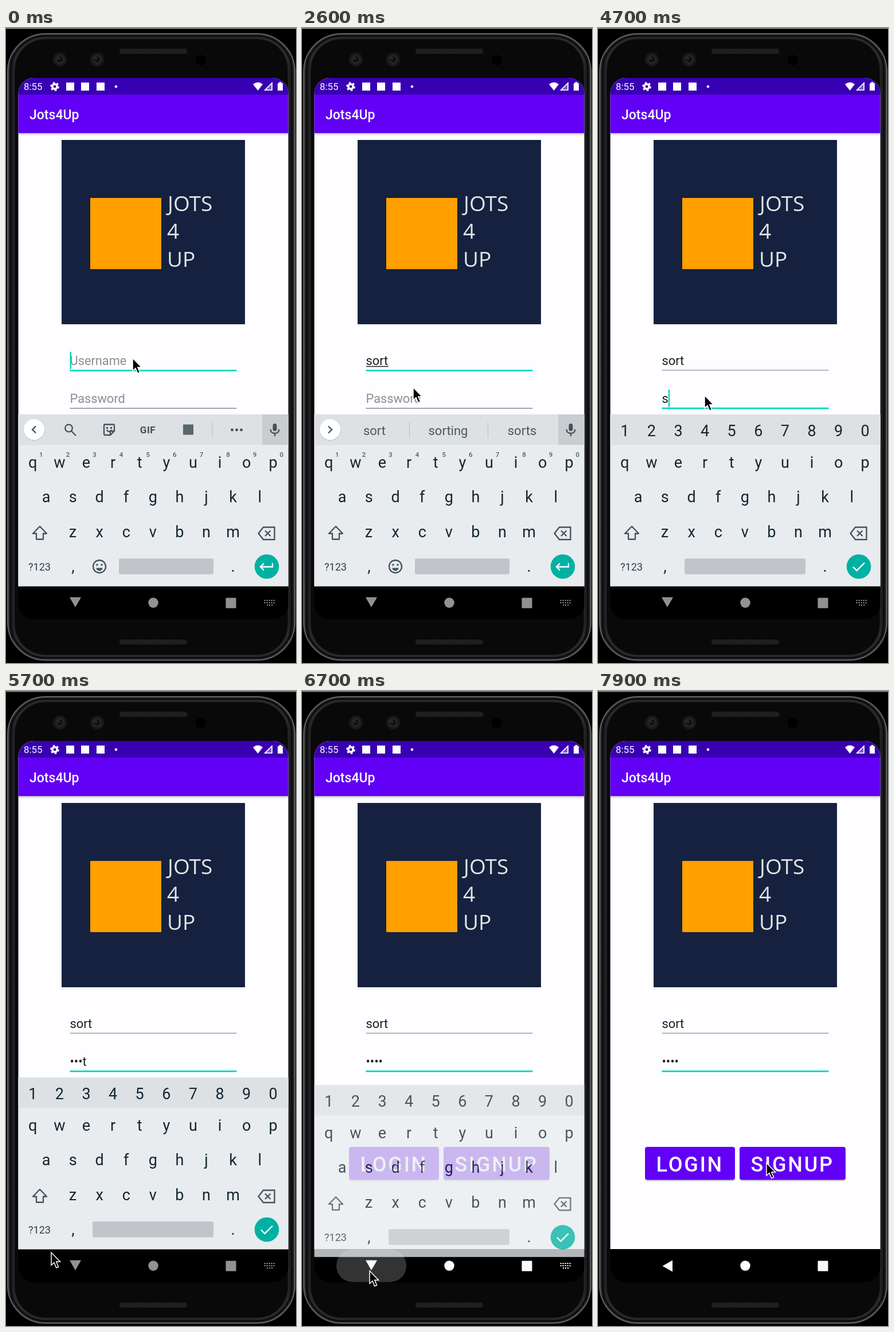
An HTML page that plays this animation: 506 px wide and 1106 px high, repeating every 8000 ms.

```html
<!DOCTYPE html>
<html lang="en">
<head>
<meta charset="utf-8">
<title>Login on a phone</title>
<style>
  html, body { margin: 0; width: 100%; height: 100%; overflow: hidden; background: #000; }
  svg { display: block; width: 506px; height: 1106px; font-family: Roboto, sans-serif; }
  .line { fill: none; stroke: #43525a; stroke-width: 2.3; }
  .key { font-size: 27px; fill: #14262f; text-anchor: middle; }
  .hint { font-size: 11.5px; font-weight: 500; fill: #4d5b62; text-anchor: middle; }
  .word { font-size: 22px; fill: #4a585f; text-anchor: middle; }
  .field { font-size: 21.8px; white-space: pre; }
  .btn { font-size: 36px; font-weight: 500; letter-spacing: 2.8px; fill: #fff; }
  .art { font-family: "Open Sans", sans-serif; font-size: 37px; fill: #e4e6e4; }
</style>
</head>
<body>
<svg viewBox="0 0 506 1106">
  <defs>
    <clipPath id="screen"><rect x="21.5" y="87" width="471" height="943" rx="27"/></clipPath>
    <linearGradient id="rim">
      <stop offset="0" stop-color="#3b3b3d"/><stop offset=".012" stop-color="#151516"/>
      <stop offset=".024" stop-color="#2a2a2c"/><stop offset=".976" stop-color="#2a2a2c"/>
      <stop offset=".988" stop-color="#151516"/><stop offset="1" stop-color="#3b3b3d"/>
    </linearGradient>
    <linearGradient id="shade" x2="0" y2="1">
      <stop offset="0" stop-color="#000" stop-opacity=".22"/><stop offset="1" stop-color="#000" stop-opacity="0"/>
    </linearGradient>
    <pattern id="mesh" width="4" height="4" patternUnits="userSpaceOnUse">
      <rect width="4" height="4" fill="#29292b"/><path d="M0 0L4 4M4 0L0 4" stroke="#141415"/>
    </pattern>
    <g id="lens">
      <circle r="12" fill="#19191b"/><circle r="8" fill="#252528"/><circle r="5" fill="#111114"/>
      <circle cx="-2" cy="-2" r="1.6" fill="#414148"/>
    </g>
  </defs>

  <!-- phone body -->
  <rect width="506" height="1106"/>
  <rect width="506" height="1.5" fill="#8b8b8b"/>
  <rect x="3" y="10" width="501" height="1091" rx="66" fill="url(#rim)" stroke="#626264" stroke-width="2"/>
  <rect x="8" y="14" width="491" height="1083" rx="61" fill="none" stroke="#0d0d0e" stroke-width="3"/>
  <rect x="15" y="19" width="477" height="1073" rx="54" fill="#09090a" stroke="#1f1f21"/>
  <use href="#lens" x="94" y="55"/><use href="#lens" x="159" y="55"/>
  <circle cx="340" cy="56" r="9"/>
  <rect x="198" y="36" width="118" height="9" rx="4" fill="url(#mesh)"/>
  <rect x="198" y="1065" width="118" height="9" rx="4" fill="url(#mesh)"/>

  <g clip-path="url(#screen)">
    <rect x="21" y="87" width="472" height="886" fill="#fefdff"/>
    <rect x="21" y="183" width="472" height="5" fill="url(#shade)"/>
    <rect x="21" y="115" width="472" height="68" fill="#6200f5"/>
    <rect x="21" y="87" width="472" height="29" fill="#3900b3"/>
    <g fill="#fff">
      <text x="31" y="108" font-size="16.8">8:55</text>
      <circle cx="85" cy="102" r="4.2" fill="none" stroke="#fff" stroke-width="3.6"/>
      <circle cx="85" cy="102" r="6.7" fill="none" stroke="#fff" stroke-width="2.4" stroke-dasharray="3.5 3.516"/>
      <rect x="105" y="95" width="14" height="14"/>
      <rect x="131" y="95" width="14" height="14"/>
      <rect x="158" y="95" width="14" height="14"/>
      <circle cx="192" cy="102" r="2.3"/>
      <path d="M431 98Q439.500 91 448 98L439.500 109Z"/>
      <path d="M465 94V109H450Z" opacity=".35"/>
      <path d="M464 96V108H452Z" fill="none" stroke="#fff" stroke-width="1.7"/>
      <path d="M474 96h2.500v-2h4v2h2.500v13h-9z"/>
      <text x="41" y="159" font-size="23" font-weight="500">Jots4Up</text>
    </g>

    <rect x="97" y="195" width="320" height="321" fill="#15213f"/>
    <rect x="147" y="296" width="124" height="124" fill="#ff9f00"/>
    <text class="art" x="282" y="319">JOTS</text>
    <text class="art" x="281" y="367">4</text>
    <text class="art" x="281" y="416">UP</text>

    <text class="field" id="user" x="111.500" y="587"></text>
    <path id="compose" d="M112 589.500H148" stroke="#222" stroke-width="1.3"/>
    <path id="userLine"/>
    <text class="field" id="pass" x="111.500" y="653"></text>
    <path id="passLine"/>
    <rect id="caret" width="2.400" height="30" fill="#08d3bd"/>

    <g id="buttons">
      <rect x="82" y="796" width="157" height="58" rx="5" fill="#000" opacity=".16"/>
      <rect x="247" y="796" width="185" height="58" rx="5" fill="#000" opacity=".16"/>
      <rect x="82" y="794" width="157" height="57.500" rx="4" fill="#6200f5"/>
      <rect x="247" y="794" width="185" height="57.500" rx="4" fill="#6200f5"/>
      <text class="btn" x="101.500" y="837">LOGIN</text>
      <text class="btn" x="266.500" y="837">SIGNUP</text>
    </g>

    <rect x="21" y="972" width="472" height="58"/>
    <rect id="ripple" x="60" y="972.500" width="122" height="57" rx="28" fill="#333334"/>
    <g id="nav">
      <path id="back" d="M111 991.500H131L121 1009Z"/>
      <circle cx="257" cy="1001" r="8.700"/>
      <rect x="383.500" y="992.500" width="18" height="18" rx="1"/>
      <path id="kbIcon" fill="none" stroke-width="2.200" stroke-dasharray="2.200 1.800"
        d="M450.500 997H470M450.500 1001H470M455 1005H466"/>
    </g>

    <g id="kb">
      <rect x="21" y="673" width="472" height="299.500" fill="#e8ecef"/>
      <rect x="21" y="673" width="472" height="53" fill="#dde1e4"/>
      <g id="keys"></g>
      <path class="line" d="M59 868L71 880.500H65V890.500H53V880.500H47Z" stroke-linejoin="round"/>
      <path class="line" d="M449 869.500H468.500V891H449L440.500 880.200ZM452 875.500L461.500 885M461.500 875.500L452 885"/>
      <text x="58.500" y="944.500" font-size="18" fill="#2f3f47" text-anchor="middle">?123</text>
      <text class="key" x="117" y="947">,</text>
      <text class="key" x="396" y="947">.</text>
      <rect id="space" y="924" height="27.500" rx="3" fill="#c1c5c9"/>
      <circle cx="455" cy="938" r="21.300" fill="#00b1a3"/>
      <path id="enter" fill="none" stroke="#fff" stroke-width="2.300"/>

      <g id="textOnly">
        <g id="hints"></g>
        <circle class="line" cx="163" cy="938" r="11"/>
        <g fill="#43525a"><circle cx="159" cy="935" r="1.800"/><circle cx="167" cy="935" r="1.800"/></g>
        <path d="M157 940.500H169Q167 945.500 163 945.500T157 940.500Z" fill="#43525a"/>
        <rect x="447" y="673" width="46" height="53" fill="#cacdd0"/>
        <rect x="465.500" y="689" width="7" height="13" rx="3.500" fill="#43525a"/>
        <path class="line" d="M461.500 699Q462 706 469 706T476.500 699M469 706V711"/>
        <circle cx="49" cy="700.500" r="18.500" fill="#000" opacity=".14"/>
        <circle cx="49" cy="699.500" r="18" fill="#fff"/>
        <path class="line" id="chevron"/>
        <g id="tools">
          <circle class="line" cx="109.500" cy="697" r="6.300"/>
          <path class="line" d="M114 702L122 710" stroke-width="3"/>
          <path class="line" d="M173 690.500H187Q189 690.500 189 692.500V702L182 709H173Q171 709 171 707V692.500Q171 690.500 173 690.500ZM189 702H182V709M175.500 700Q180 706 184.500 700" stroke-width="2"/>
          <path d="M175 695h3v3h-3zM182 695h3v3h-3z" fill="#43525a"/>
          <text x="247.500" y="705.500" font-size="17" font-weight="700" fill="#43525a" text-anchor="middle" letter-spacing=".5">GIF</text>
          <rect x="309" y="690.500" width="18" height="18" fill="#59666d"/>
          <path d="M360 686V713" stroke="#b9bec2"/>
          <g fill="#43525a"><circle cx="394.500" cy="700" r="2.400"/><circle cx="402.500" cy="700" r="2.400"/><circle cx="410.500" cy="700" r="2.400"/></g>
        </g>
        <g id="words">
          <path d="M187.500 686V713M324.500 686V713" stroke="#b9bec2"/>
          <text class="word" x="126.500" y="708.500">sort</text>
          <text class="word" x="255" y="708.500">sorting</text>
          <text class="word" x="384" y="708.500">sorts</text>
        </g>
      </g>
      <g id="digits"></g>
    </g>
  </g>

  <path id="mouse" d="M0 0V22L5 17.500L8.700 26.500L12.500 25L8.800 16H15.500Z" stroke="#fff" stroke-width="1.500"/>
</svg>
<script>
const $ = id => document.getElementById(id);
const LOOP = 8000, STEP = 100, PITCH = 46.6;
const WORD = "sort";
const userTimes = [1600, 1750, 1900, 2050];
const passTimes = [4550, 4750, 4950, 5150];
const SWITCH = 3600, MASK = 1500, HIDE = 6600, HIDDEN = 6860;
// time, x, y
const moves = [[0, 221, 575], [2300, 221, 575], [2600, 194, 626], [2900, 186, 640], [5200, 186, 640],
  [5700, 79, 978], [6300, 118, 1010], [7000, 118, 1010], [7900, 294, 822]];

const row = (chars, x, y, cls) => [...chars].map((c, i) =>
  `<text class="${cls}" x="${x + i * PITCH}" y="${y}">${c}</text>`).join("");
$("keys").innerHTML = row("qwertyuiop", 46.8, 766, "key") + row("asdfghjkl", 70, 826, "key") +
  row("zxcvbnm", 116.5, 887, "key");
$("hints").innerHTML = row("1234567890", 61.3, 747, "hint");
$("digits").innerHTML = row("1234567890", 46.8, 710.5, "key");

const set = (id, attrs) => { for (const k in attrs) $(id).setAttribute(k, attrs[k]); };
const show = (id, on) => set(id, { visibility: on ? "visible" : "hidden" });
const clamp = v => Math.max(0, Math.min(1, v));

function mouseAt(t) {
  let i = 0;
  while (i < moves.length - 2 && t > moves[i + 1][0]) i++;
  const [a, b] = [moves[i], moves[i + 1]];
  const p = clamp((t - a[0]) / (b[0] - a[0]));
  return [a[1] + (b[1] - a[1]) * p, a[2] + (b[2] - a[2]) * p];
}

function fill(id, text, hint) {
  $(id).textContent = text || hint;
  set(id, { fill: text ? "#1d1d1f" : "#8d8d8f" });
}

function underline(id, y, active) {
  set(id, { d: `M111.500 ${y}H402.500`, stroke: active ? "#08d8c0" : "#757577", "stroke-width": active ? 2.8 : 1.2 });
}

function render(t) {
  const onPass = t >= SWITCH;
  const user = WORD.slice(0, userTimes.filter(k => k <= t).length);
  const typed = passTimes.filter(k => k <= t);
  const n = typed.length;
  const visible = n && t - typed[n - 1] < MASK;
  const pass = "•".repeat(visible ? n - 1 : n) + (visible ? WORD[n - 1] : "");

  fill("user", user, "Username");
  fill("pass", pass, "Password");
  underline("userLine", onPass ? 596 : 596.7, !onPass);
  underline("passLine", 662.3, onPass);
  const userWidth = user ? $("user").getComputedTextLength() : 0;
  show("compose", user && !onPass);
  set("compose", { d: `M112 589.500h${userWidth}` });

  // the caret restarts its blink at every key and on focus
  const since = [-500, ...userTimes, SWITCH, ...passTimes].filter(k => k <= t).pop();
  const wide = onPass ? (pass ? $("pass").getComputedTextLength() : 0) : userWidth;
  show("caret", (t - since + (since < 0 ? 500 : 0)) % 1000 < 500);
  set("caret", { x: 111.5 + wide, y: onPass ? 630 : 564 });

  for (const id of ["textOnly", "digits"]) $(id).style.display = (id === "digits") === onPass ? "" : "none";
  $("tools").style.display = user ? "none" : "";
  $("words").style.display = user ? "" : "none";
  set("chevron", { d: user ? "M46 693.500L52 699.500L46 705.500" : "M52 693.500L46 699.500L52 705.500" });
  set("space", { x: onPass ? 151 : 197, width: onPass ? 211 : 165 });
  set("enter", { d: onPass ? "M445 938.500L451.500 945L465 931.500" : "M465 932V938.500H444.500M450 932.500L444 938.500L450 944.500" });

  const p = clamp((t - HIDE) / (HIDDEN - HIDE));
  set("kb", { transform: `translate(0 ${90 * p * p})`, opacity: clamp(1 - 1.5 * p * p) });
  show("kb", p < 1);
  show("kbIcon", p < 1);
  const tone = t >= HIDE ? "#fbfbfb" : "#919193";
  set("nav", { fill: tone });
  set("kbIcon", { stroke: tone });
  set("back", { transform: `rotate(${90 * clamp((t - 6700) / 200)} 120.500 1001)` });
  set("ripple", { opacity: t < 6500 ? 0 : clamp((7100 - t) / 400) });

  const [x, y] = mouseAt(t);
  set("mouse", { transform: `translate(${x} ${y})` });
}

const start = performance.now();
function tick() {
  const t = (performance.now() - start) % LOOP;
  render(Math.floor(t / STEP) * STEP);
  requestAnimationFrame(tick);
}
tick();
</script>
</body>
</html>
```
